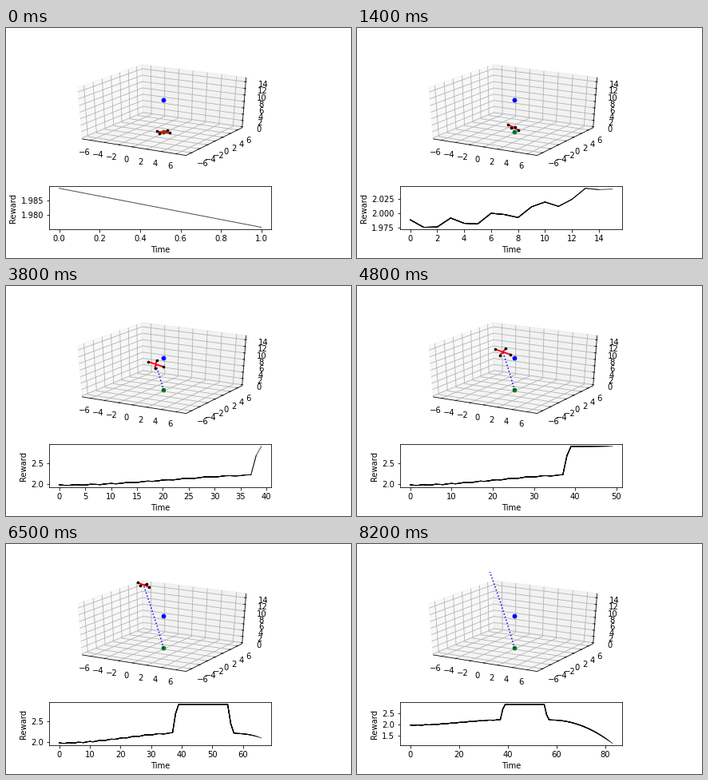
Write a matplotlib script that moves like this. It is 432 by 288 pixels and loops after 8.3 s.

```python
import numpy as np
import matplotlib.pyplot as plt
from matplotlib.animation import FuncAnimation
from matplotlib.patches import Polygon, Rectangle

plt.rcParams.update({"font.family": "DejaVu Sans", "font.size": 10})

W, H, DPI = 432, 288, 72
FRAMES, STEP = 83, 100
LEFT, WIDE = 54, 278.4          # shared by both plots
TOP, TALL = 34.56, 135.9        # upper plot
LOW_TOP, LOW_TALL = 198.3, 53.7
SCALE = 24 / 25                 # shrinks the padded cube to unit size
BOX = 0.5 / SCALE               # half size of the padded cube
TEXT = 0.608 / SCALE            # distance of tick labels from the centre

fig = plt.figure(figsize=(W / DPI, H / DPI), dpi=DPI, facecolor="white")
stage = fig.add_axes([0, 0, 1, 1])
stage.set(xlim=(0, W), ylim=(H, 0))
stage.axis("off")


def project(*point):
    """Perspective view of the cube (elev 30, azim -60) in stage pixels."""
    x, y, z = (SCALE * p for p in point)
    c, s = np.cos(np.radians(60)), np.sin(np.radians(60))
    right = s * x + c * y
    up = -c * c * x + s * c * y + s * z
    depth = c * s * x - s * s * y + c * z
    w = 1.85 * (10 - depth) / 10
    return (LEFT + WIDE * (0.95 / 1.85 + right / w),
            TOP + TALL * (0.9 / 1.85 - up / w))


def path(points, **style):
    xs, ys = zip(*(project(*p) for p in points))
    stage.plot(xs, ys, solid_capstyle="butt", **style)


def pane(points, shade):
    stage.add_patch(Polygon([project(*p) for p in points], fc=str(shade),
                            ec=str(shade), alpha=0.5, lw=1, zorder=0))


def label(value, point):
    x, y = project(*point)
    stage.text(x, y, str(value).replace("-", "\u2212"), ha="center", va="top")


def draw_room():
    b, t = BOX, TEXT
    pane([(-b, -b, -b), (-b, b, -b), (-b, b, b), (-b, -b, b)], 0.95)
    pane([(-b, b, -b), (b, b, -b), (b, b, b), (-b, b, b)], 0.90)
    pane([(-b, -b, -b), (b, -b, -b), (b, b, -b), (-b, b, -b)], 0.925)

    grid = dict(color="#b0b0b0", lw=0.8, zorder=1)
    edge = dict(color="black", lw=0.8, zorder=2)
    inner, outer = b - 1 / 60, b + 1 / 120
    for v in range(-6, 7, 2):
        n = v / 14
        path([(n, -b, -b), (n, b, -b), (n, b, b)], **grid)
        path([(b, n, -b), (-b, n, -b), (-b, n, b)], **grid)
        path([(n, -inner, -b), (n, -outer, -b)], **edge)
        path([(inner, n, -b), (outer, n, -b)], **edge)
        label(v, (n, -t, -t))
        label(v, (t, n, -t))
    for v in range(0, 15, 2):
        n = v / 15 - 0.5
        path([(-b, -b, n), (-b, b, n), (b, b, n)], **grid)
        path([(inner, b, n), (outer, b, n)], **edge)
        label(v, (t, t, n))
    path([(-b, -b, -b), (b, -b, -b), (b, b, -b), (b, b, b)], **edge)


draw_room()
window = Rectangle((LEFT, TOP), WIDE, TALL, transform=stage.transData)


def live(*args, **style):
    line, = stage.plot([], [], *args, **style)
    line.set_clip_path(window)
    return line


home, goal = project(0, 0, -0.5), project(0, 0, 10 / 15 - 0.5)
stage.plot(*home, "o", color="green", ms=5, mew=0.8, zorder=3)
stage.plot(*goal, "o", color="blue", ms=5, mew=0.8, zorder=3)
trail = live(":", color="blue", lw=1.5, zorder=4)
arms = [live(color="red", lw=1.8, zorder=5) for _ in range(2)]
rotors = live("o", color="black", ms=3, mew=0.6, zorder=6)


def centre(k):
    """Accelerating climb that drifts to the left."""
    u = k / 72
    return home[0] - 30 * u ** 1.83, home[1] - 94 * u ** 1.66


def arm_tips(k):
    """Half lengths of the two arms as the drone slowly wobbles."""
    turn = 2 * np.pi * k / 58
    c, s = np.cos(turn), np.sin(turn)
    return ((8 - 1.7 * s, 1 + 2.5 * abs(s)),
            (2.5 + 2.5 * c, -2.7 + 0.7 * c + 2.2 * s))


def reward_curve(t):
    """Stepped rise, plateau near the goal, then a parabolic fall."""
    steps = (np.sqrt(9 + 0.26 * t) - 3) / 0.13
    rise = 1.98 + 0.125 * (1 - np.cos(np.pi * t / 42))
    rise += 0.009 * np.cos(2 * np.pi * steps)
    plateau = np.interp(t, [37, 38, 39, 55, 56, 57],
                        [2.222, 2.69, 2.91, 2.91, 2.45, 2.225])
    fall = 2.21 - 0.00166 * (t - 58) ** 2
    return np.where(t < 38, rise, np.where(t < 58, plateau, fall))


time = np.arange(FRAMES + 1)
reward = reward_curve(time)

chart = fig.add_axes([LEFT / W, 1 - (LOW_TOP + LOW_TALL) / H,
                      WIDE / W, LOW_TALL / H])
chart.set_xlabel("Time")
chart.set_ylabel("Reward")
# Overlaid copies, each one step shorter, darken the older part of the curve.
curves = [chart.plot([], [], color="black", lw=1, alpha=0.7)[0]
          for _ in range(8)]


def padded(low, high):
    gap = 0.05 * (high - low)
    return low - gap, high + gap


def update(k):
    xs, ys = centre(np.arange(k + 1))
    trail.set_data(xs, ys)
    cx, cy = xs[-1], ys[-1]
    dots = []
    for arm, (dx, dy) in zip(arms, arm_tips(k)):
        tips = [(cx - dx, cy - dy), (cx + dx, cy + dy)]
        arm.set_data(*zip(*tips))
        dots += tips
    rotors.set_data(*zip(*dots))

    n = k + 2
    for i, curve in enumerate(curves):
        m = max(n - i, 0)
        curve.set_data(time[:m], reward[:m])
    chart.set_xlim(padded(0, n - 1))
    chart.set_ylim(padded(reward[:n].min(), reward[:n].max()))
    return [trail, *arms, rotors, *curves]


anim = FuncAnimation(fig, update, frames=FRAMES, interval=STEP,
                     init_func=lambda: update(0), repeat=True, blit=False)
plt.show()
```
